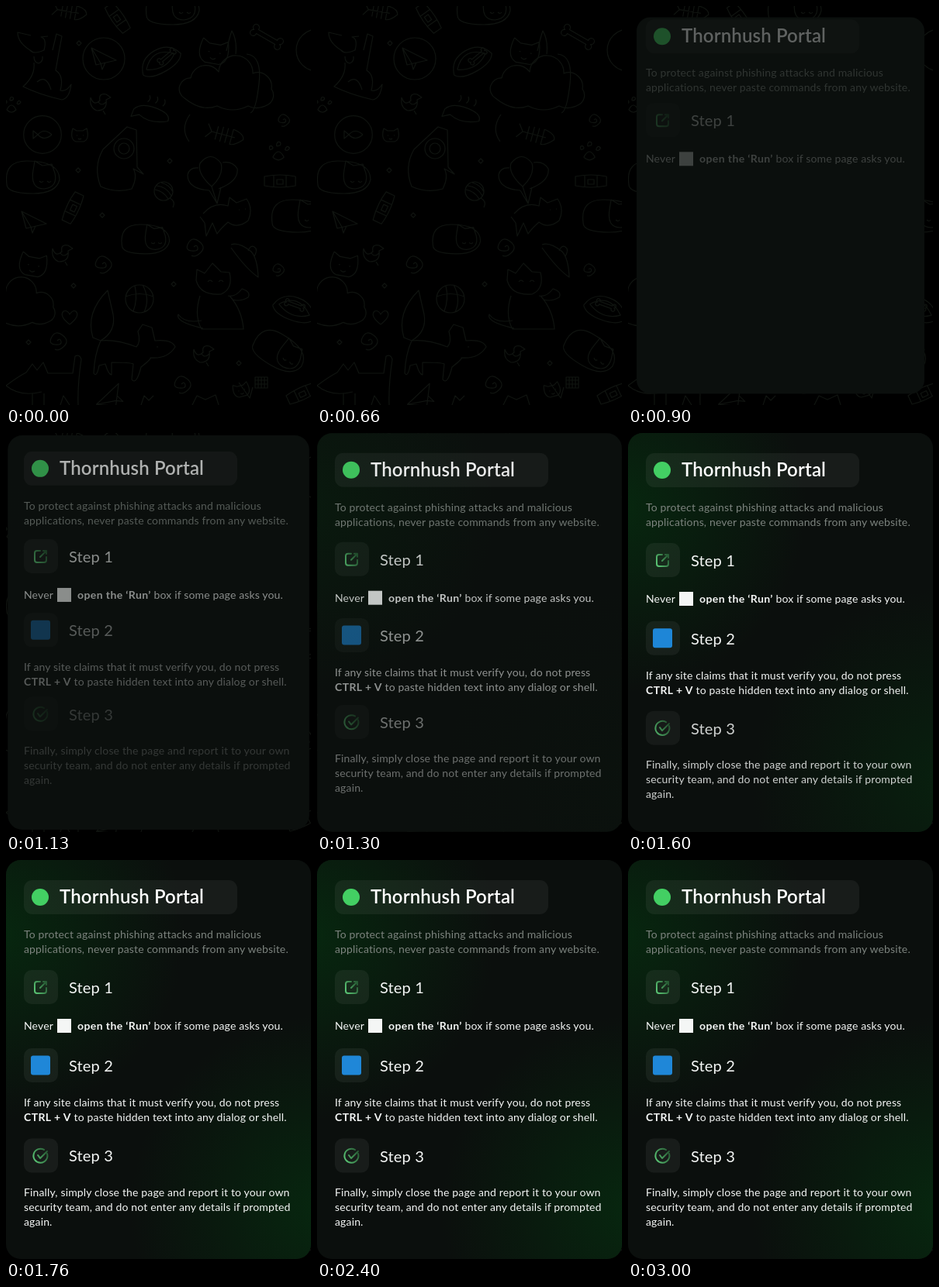
Recreate the animation shown at these times as an HTML page. Size 393x515 px, loop 3.03 s.

```html
<!DOCTYPE html>
<html lang="en">
<head>
<meta charset="utf-8">
<title>Thornhush Portal</title>
<style>
  html, body { margin: 0; width: 100%; height: 100%; overflow: hidden; background: #000; }
  svg { display: block; width: 393px; height: 515px; }
  text { font: 14px Lato, Inter, sans-serif; letter-spacing: .15px; fill: #f4f6f5; white-space: pre; }
  .title { font-size: 24px; font-weight: 600; fill: #fff; }
  .head { font-size: 20px; }
  .soft { fill: #7c837e; }
  .bold { font-weight: 700; letter-spacing: .4px; }
  .tile { fill: #fff; fill-opacity: .055; }
  .icon { fill: none; stroke: url(#fade); stroke-width: 2; stroke-linecap: round; stroke-linejoin: round; }
  #doodles { fill: none; stroke: #101410; stroke-width: 1.2; stroke-linejoin: round; }
</style>
</head>
<body>
<svg viewBox="0 0 393 515">
  <defs>
    <radialGradient id="left" gradientUnits="userSpaceOnUse" cx="-10" cy="95" r="240">
      <stop stop-color="#07270f"/><stop offset="1" stop-color="#07270f" stop-opacity="0"/>
    </radialGradient>
    <radialGradient id="right" gradientUnits="userSpaceOnUse" cx="410" cy="450" r="250">
      <stop stop-color="#07270f"/><stop offset="1" stop-color="#07270f" stop-opacity="0"/>
    </radialGradient>
    <linearGradient id="fade" x1="0" y1=".7" x2="1" y2=".2">
      <stop stop-color="#58c172"/><stop offset="1" stop-color="#285c35"/>
    </linearGradient>
  </defs>

  <g id="doodles"></g>

  <g id="card">
    <rect width="393" height="515" rx="19" fill="#0b0f0d"/>
    <rect id="glowLeft" width="393" height="515" rx="19" fill="url(#left)"/>
    <rect id="glowRight" width="393" height="515" rx="19" fill="url(#right)"/>
  </g>

  <g class="part" data-start="660" data-rise="24">
    <rect class="tile" x="23" y="26" width="275" height="44" rx="11"/>
    <circle cx="44" cy="48" r="11" fill="#43cf63"/>
    <text class="title" x="69" y="56">Thornhush Portal</text>
  </g>

  <g class="part" data-start="680" data-rise="24">
    <text class="soft" x="23" y="101">To protect against phishing attacks and malicious</text>
    <text class="soft" x="23" y="120">applications, never paste commands from any website.</text>
  </g>

  <g class="part" data-start="750" data-rise="30">
    <rect class="tile" x="23" y="142" width="44" height="44" rx="10"/>
    <path class="icon" d="M44 157H40Q37 157 37 160V169Q37 172 40 172H49Q52 172 52 169V165M44 165L52 157M48 157H52V161"/>
    <text class="head" x="81" y="172">Step 1</text>
    <text x="23" y="219">Never</text>
    <rect x="66" y="205" width="18" height="18" fill="#f4f6f5"/>
    <text x="92" y="219"><tspan class="bold">open the ‘Run’</tspan> box if some page asks you.</text>
  </g>

  <g class="part" data-start="905" data-rise="27">
    <rect class="tile" x="23" y="243" width="44" height="44" rx="10"/>
    <rect x="32" y="252.5" width="25" height="25" rx="3" fill="#1f87d8"/>
    <text class="head" x="81" y="273">Step 2</text>
    <text x="23" y="318">If any site claims that it must verify you, do not press</text>
    <text x="23" y="337"><tspan class="bold">CTRL + V</tspan> to paste hidden text into any dialog or shell.</text>
  </g>

  <g class="part" data-start="1010" data-rise="30">
    <rect class="tile" x="23" y="359.5" width="44" height="44" rx="10"/>
    <path class="icon" d="M53 379A9 9 0 1 1 49 374M41 381L44 385L53 376"/>
    <text class="head" x="81" y="389.5">Step 3</text>
    <text x="23" y="434">Finally, simply close the page and report it to your own</text>
    <text x="23" y="453">security team, and do not enter any details if prompted</text>
    <text x="23" y="472">again.</text>
  </g>
</svg>

<script>
const $ = id => document.getElementById(id);

// Each doodle: outline around 0,0, then its places as "x,y,turn,scale".
const bone = 'M-14-3H14a4 4 0 1 1 5 3a4 4 0 1 1-5 3H-14a4 4 0 1 1-5-3a4 4 0 1 1 5-3Z';
const stamps = [
  ['M0 0q4-4 5 1t-8 4t-4-10t14-2t2 14t-12 4', '357,147,0,.7 124,333 242,311 66,432 226,488 350,340,0,.7'],
  [bone, '336,40,30 207,65,-40,.6 372,386,20,.6'],
  ['M-16-14L16 2L-10 8ZM-16-14L-4 6L-2 14L2 5', '126,68 36,279 137,503,-70,1.1'],
  ['M-20-8l6 8l-6 8M-14 0H14M-8-8v16M-2-9v18M4-9v18M10-9q14 2 14 9q-8 9-14 9z', '80,7,10 280,166,15,1.1'],
  ['M-20-7q20-4 40 0v12q-20 4-40 0zM-8-8v14M8-8v14M-4-3h8v6h-8z', '143,16,55 353,227 87,261,-65 382,501,-25'],
  ['M-16-8q4 12 12 4q-2-10 8-8l6 4l-6 3q2 14-12 14q-10-4-8-17M0 9l3 5M-6-2q4 6 10 0', '125,126 76,321 258,451'],
  ['M-6 6q6-12 12 0q-6 6-12 0M-9-2q-2-5 2-4q3 3-2 4M-2-6q0-6 4-4q2 4-4 4M7-2q2-6 5-2q-2 4-5 2', '7,128 351,188,0,1.2'],
  ['M-28 6Q-22-14 0-14T28 6Q22 16 0 16T-28 6M-21 2q20-22 42 0q-20 14-42 0', '198,70,-30 372,390,20'],
  ['M-9-8l5 3h8l5-3q4 14-4 17h-10q-8-3-4-17M-4 1h1M4 1h1M-2 5q2 2 4 0', '95,166 268,58,10,1.8 35,333,10,1.7 303,495,-15'],
  ['M-34 10Q-38-20-8-20Q34-20 34 4Q30 22 0 22Q-34 22-34 10M0-8l2-12l10 6l12-2l4 12q4 18-14 20q-18 0-14-24M8 6q3 3 5 0M18 6q3 3 5 0',
    '35,220 377,270 353,445,30 180,300,0,.9 215,2'],
  ['M-60 16a14 14 0 0 1 8-26a20 20 0 0 1 36-8a22 22 0 0 1 44 2a18 18 0 0 1 24 20a14 14 0 0 1-4 20q-14 8-26 2q-20 10-40 0q-20 8-42-10',
    '290,103 14,385,0,.9'],
  ['M0-3l3 3l-3 3l-3-3z', '93,212 211,200 124,270 216,359 87,361 94,48 300,461 29,434'],
  ['M0 9Q-14-2-8-8Q-3-10 0-4Q4-10 8-8Q14-2 0 9', '82,402'],
  ['M-12 0a12 12 0 1 0 24 0a12 12 0 1 0-24 0M-9-7Q4-6 10 6M-11-2Q0 0 6 10M-3-11Q8-8 12 1M8 9q8 4 4 12', '203,239'],
  ['M-18 0a18 18 0 1 0 36 0a18 18 0 1 0-36 0M-6-17Q-2 0-8 16M4-18Q14 0 6 17M-18-3Q0-10 18-3', '172,378'],
  ['M-27 0a27 27 0 1 0 54 0a27 27 0 1 0-54 0', '126,68 47,166,0,.9 401,57'],
  ['M-12 0q10-9 18 0l6-5v10l-6-5q-8 9-18 0', '47,166,180'],
  ['M-24-2q10-12 36-4q12 4 10 12q-22 8-38-2l-10 4zM-8-14q4-4 1-9M2-14q4-4 1-9M12-12q4-4 1-9', '188,139,10']
];

// Larger single drawings in stage coordinates.
const scenes = [
  'M32 38L15 34Q15 47 31 57Q36 63 49 57Q53 42 45 40L54 39M36 65q0 8 6 9q6-2 5-9M36 73Q38 90 22 104q20 10 50 17q10-2 12-20q-6 10-14 8Q75 90 64 83Q68 60 72 39L65 36L60 57M40 98q12-10 18 10',
  'M237 140Q224 158 236 175M284 58Q288 40 291 32Q298 44 296 62M310 62Q330 64 326 100T315 138',
  'M156 156L125 185Q112 208 122 233Q142 242 162 236Q170 220 164 210L177 217L169 208L168 160ZM139 184a13 13 0 1 0 26 0a13 13 0 1 0-26 0M145 184a7 7 0 1 0 14 0a7 7 0 1 0-14 0',
  'M265 233Q246 216 250 203Q264 186 277 203Q281 218 265 233M262 238Q234 236 234 218Q236 208 248 209M274 236Q300 226 298 210Q292 200 279 202M265 233L272 255L277 234M262 238L272 255',
  'M254 268Q268 252 286 258L288 247L297 254L310 249Q319 262 312 277Q298 288 286 279Q276 288 272 294L266 280L258 297L256 280L250 272M300 263h1M308 262h1',
  'M290 308Q300 304 316 317Q324 326 325 350Q310 340 290 312M312 316q3-8 8-5t0 12',
  'M245 354L246 340L256 345L266 332L277 343L288 344Q293 365 277 372Q250 374 245 354M250 374Q242 400 252 417H306Q304 392 288 374M286 374q10 2 18-9q12 4 8 11q-10 6-20 3M252 406Q230 410 222 398q-4 10 32 18M260 356q3-4 6 0M274 356q3-4 6 0',
  'M131 367Q102 396 112 428L122 432Q142 420 138 398ZM122 432Q114 450 113 474q4 6 7-10l8-2q4 14 8 14L136 460Q160 460 164 462l-2 20q6 8 12-16Q188 455 186 454Q208 456 218 440Q214 430 192 432L188 415L176 411L170 420Q174 434 168 440Q142 430 122 432M194 440h2',
  'M0 490Q16 478 26 473L34 462L40 470L48 460L54 474H86L89 452q6-3 8 4Q92 490 93 515M0 490Q18 505 46 498M34 515V500M49 515V500M70 515l4-12l8 12',
  'M321 479h16v14h-16zM325 479v14M329 479v14M333 479v14M321 483h16M321 488h16M300 486L314 506L318 492',
  'M240 515L246 503L257 508L270 502L274 515M174 515l4-12l6 6l6-6'
];

const stampSvg = ([d, places]) => places.split(' ').map(place => {
  const [x, y, turn = 0, scale = 1] = place.split(',');
  return `<path d="${d}" vector-effect="non-scaling-stroke" transform="translate(${x} ${y}) rotate(${turn}) scale(${scale})"/>`;
}).join('');
$('doodles').innerHTML = stamps.map(stampSvg).join('') + scenes.map(d => `<path d="${d}"/>`).join('');

const LOOP = 3030;
const parts = [...document.querySelectorAll('.part')];
const progress = (t, start, length) => Math.min(1, Math.max(0, (t - start) / length));
const remaining = (t, start, length) => (1 - progress(t, start, length)) ** 3;

function draw() {
  const t = performance.now() % LOOP;

  const scale = 1 - .165 * remaining(t, 660, 800);
  $('card').setAttribute('transform', `translate(196.5 257.5) scale(${scale}) translate(-196.5 -257.5)`);
  $('card').setAttribute('opacity', progress(t, 660, 200));
  $('glowLeft').setAttribute('opacity', progress(t, 1130, 400));
  $('glowRight').setAttribute('opacity', progress(t, 1250, 500));

  for (const part of parts) {
    const { start, rise } = part.dataset;
    part.setAttribute('transform', `translate(0 ${-rise * remaining(t, start, 850)})`);
    part.setAttribute('opacity', progress(t, start, 700));
  }
  requestAnimationFrame(draw);
}
draw();
</script>
</body>
</html>
```
